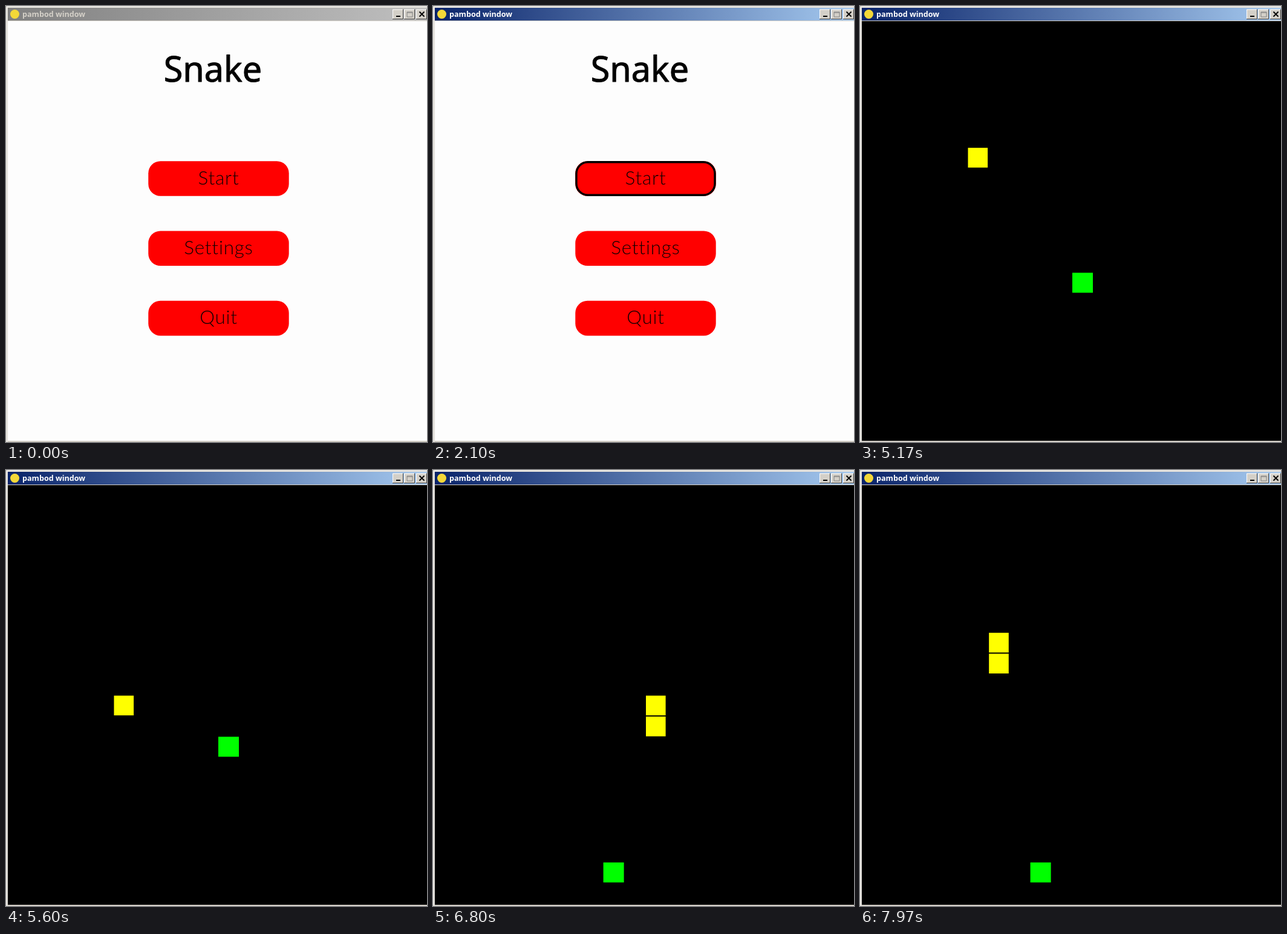
An HTML page for the animation above (8 s loop, 696 by 720 pixels).

```html
<!DOCTYPE html>
<html lang="en">
<head>
<meta charset="utf-8">
<title>Snake</title>
<style>
  html, body { margin: 0; width: 100%; height: 100%; overflow: hidden; background: #000; }
  svg { display: block; width: 100%; height: 100%; }
  .caption { font: bold 12.6px "Noto Sans", sans-serif; }
  .heading { font: 57.5px "Noto Sans", sans-serif; stroke: #000; stroke-width: 1; stroke-linejoin: round; }
  .label { font: 300 31.4px Lato, sans-serif; letter-spacing: .8px; font-variant-ligatures: none; fill: #100; }
</style>
</head>
<body>
<svg viewBox="0 0 696 720">
  <defs>
    <linearGradient id="active">
      <stop offset="0" stop-color="#0a246a"/>
      <stop offset="1" stop-color="#a6caf0"/>
    </linearGradient>
    <linearGradient id="inactive">
      <stop offset="0" stop-color="#808080"/>
      <stop offset="1" stop-color="#c0c0c0"/>
    </linearGradient>
  </defs>

  <rect width="696" height="720" fill="#d4d0c8"/>
  <path d="M1.5 720V1.5H696" fill="none" stroke="#fff"/>
  <rect id="bar" x="3" y="3" width="693" height="21"/>
  <circle cx="14.5" cy="13.5" r="7.5" fill="#f4d838"/>
  <text id="caption" class="caption" x="27" y="18">pambod window</text>
  <g id="controls"></g>

  <g id="menu">
    <rect x="3" y="25" width="693" height="693" fill="#fdfdfd"/>
    <text class="heading" x="342" y="124.5" text-anchor="middle">Snake</text>
    <g id="buttons"></g>
    <rect id="hover" x="237" y="257.8" width="229" height="54.4" rx="19" fill="none" stroke="#000" stroke-width="3.4"/>
  </g>

  <g id="game">
    <rect x="3" y="25" width="693" height="693"/>
    <rect id="food" width="34" height="33" fill="#0f0"/>
    <rect id="tail" width="32.6" height="32.6" fill="#ff0"/>
    <rect id="head" width="32.6" height="32.6" fill="#ff0"/>
  </g>
</svg>
<script>
const $ = id => document.getElementById(id);
const LOOP = 8000, HOVER = 770, FOCUS = 2000, PLAY = 3730, MOVE = 5170, STEP = 102;
const DIRS = { D: [0, 1], R: [1, 0], U: [0, -1], L: [-1, 0] };
const ROUTE = "DDDDDDDD" + "RRRRR" + "UUUUUUUU" + "LLLL" + "DDD";
const EAT = 14; // moves made when the food is reached

// Cells visited by the head, as [column, row]
const cells = [[5, 5]];
for (const d of ROUTE) {
  const [x, y] = cells[cells.length - 1];
  cells.push([x + DIRS[d][0], y + DIRS[d][1]]);
}

$("buttons").innerHTML = ["Start", "Settings", "Quit"].map((name, i) => {
  const y = 256.2 + i * 115.3;
  return `<rect x="235.3" y="${y}" width="232.4" height="57.6" rx="20" fill="#f00"/>
    <text class="label" x="351.5" y="${y + 38.3}" text-anchor="middle">${name}</text>`;
}).join("");

const glyphs = [
  '<path d="M6 11.5h7" stroke="#000" stroke-width="2"/>',
  '<path d="M5 4.5h9v8h-9zM5 5.5h9" stroke="#808080" fill="none"/>',
  '<path d="M5.5 4l8 8m0-8l-8 8" stroke="#000" stroke-width="1.8"/>'
];
$("controls").innerHTML = glyphs.map((glyph, i) =>
  `<g transform="translate(${[639, 658, 678][i]} 5.5)">
    <rect width="18" height="16.5" fill="#d4d0c8"/>
    <path d="M.5 16V.5H17" stroke="#fff" fill="none"/>
    <path d="M0 16H17.5V0" stroke="#404040" fill="none"/>${glyph}</g>`).join("");

function place(el, [col, row], dx = 0, dy = 0) {
  el.setAttribute("x", 5 + col * 34.7 + dx);
  el.setAttribute("y", 26.6 + row * 34.6 + dy);
}

function show(el, on) {
  el.style.display = on ? "" : "none";
}

function render(t) {
  const focused = t >= FOCUS;
  $("bar").setAttribute("fill", focused ? "url(#active)" : "url(#inactive)");
  $("caption").setAttribute("fill", focused ? "#fff" : "#d4d0c8");
  show($("menu"), t < PLAY);
  show($("hover"), t >= HOVER);
  show($("game"), t >= PLAY);

  const moves = t < MOVE ? 0 : Math.min(ROUTE.length, Math.floor((t - MOVE) / STEP) + 1);
  const eaten = moves >= EAT;
  place($("head"), cells[moves]);
  place($("tail"), cells[Math.max(0, moves - 1)]);
  show($("tail"), eaten);
  place($("food"), eaten ? [8, 18] : [10, 12], -1, -1.3);
}

const start = performance.now();
function tick() {
  render((performance.now() - start) % LOOP);
  requestAnimationFrame(tick);
}
tick();
</script>
</body>
</html>
```
